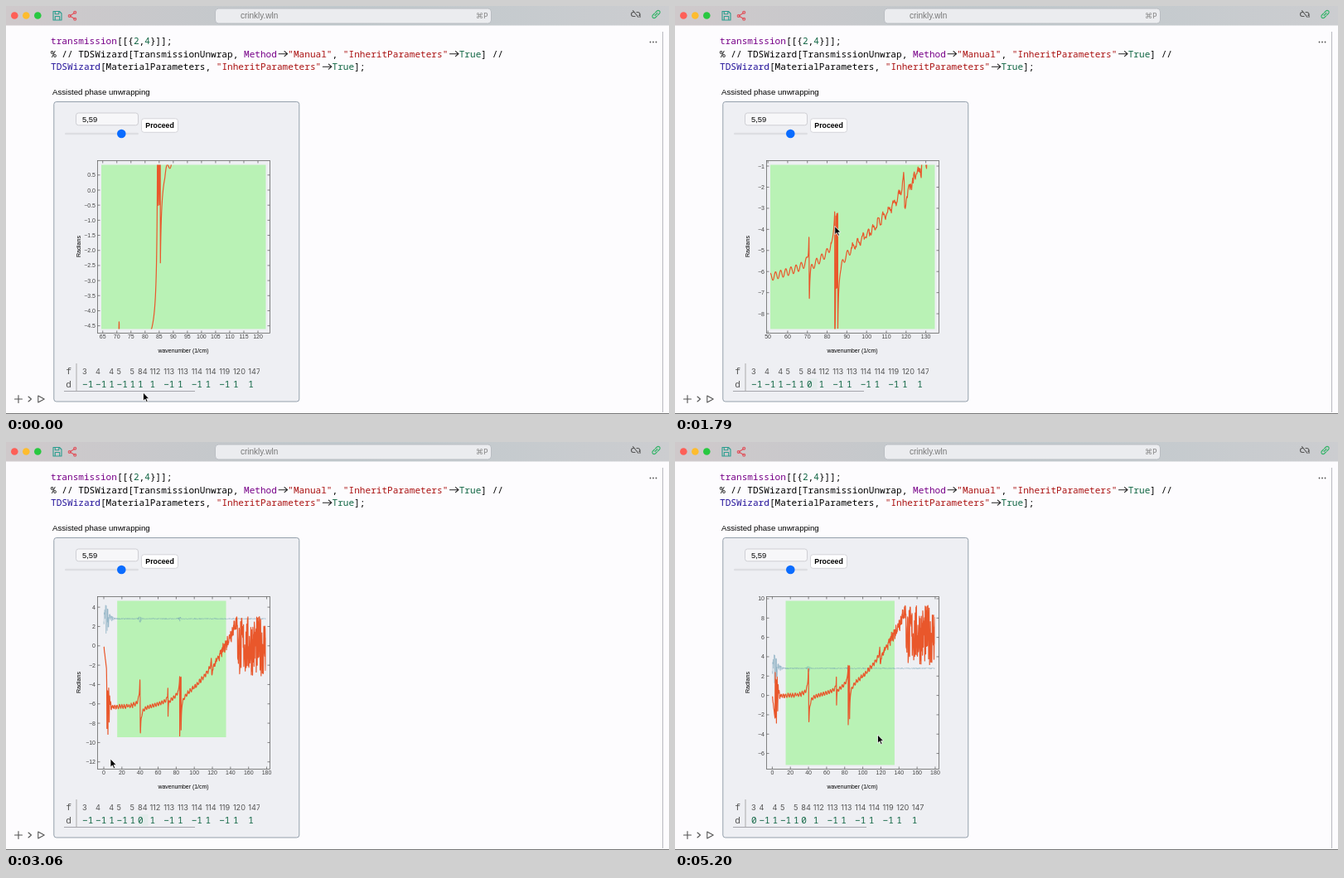
These frames come from a looping animation (800 px wide and 492 px high, 5.23 s). An HTML page:

```html
<!DOCTYPE html>
<html lang="en">
<head>
<meta charset="utf-8">
<title>Assisted phase unwrapping</title>
<style>
html, body { margin: 0; width: 100%; height: 100%; overflow: hidden; background: #fdfcfe; }
svg { display: block; width: 800px; height: 492px; font-family: "Liberation Sans", Arial, sans-serif; }
text { white-space: pre; }
.code { font: 11.1px "Noto Sans Mono", "DejaVu Sans Mono", monospace; }
.freq { font: 9.2px Inter, sans-serif; fill: #555; }
.tick { font-size: 7px; fill: #444; }
.line { fill: none; stroke: #555; stroke-width: 1.1; stroke-linecap: round; stroke-linejoin: round; }
.p { fill: #708; } .s { fill: #a11; } .n { fill: #164; } .b { fill: #219; }
.curve { fill: none; stroke-linejoin: round; vector-effect: non-scaling-stroke; }
</style>
</head>
<body>
<svg viewBox="0 0 800 492">
  <defs>
    <clipPath id="area"><rect x="115" y="191.5" width="198.5" height="198"/></clipPath>
    <clipPath id="cells"><rect x="86" y="428" width="220" height="40"/></clipPath>
    <linearGradient id="bar">
      <stop stop-color="#cfc9cb"/><stop offset=".5" stop-color="#bfc8cc"/><stop offset="1" stop-color="#cccdd0"/>
    </linearGradient>
  </defs>

  <!-- window -->
  <rect width="800" height="492" fill="#fdfcfe"/>
  <rect width="800" height="23.5" fill="url(#bar)"/>
  <path d="M0 491.5H800" stroke="#777"/>
  <path d="M792.5 31V490" stroke="#b9b9bf"/>
  <circle cx="10.3" cy="11.5" r="4.3" fill="#fe5f57"/>
  <circle cx="24.3" cy="11.5" r="4.3" fill="#febc2e"/>
  <circle cx="38.3" cy="11.5" r="4.3" fill="#28c840"/>
  <g class="line">
    <path stroke="#2a9d8f" d="M57 6.5h7.5l2.5 2.5v8h-10zM59.3 6.8v3h4.5v-3M59.3 17v-4.5h5.4v4.5"/>
    <g stroke="#e0505a"><path d="M83 8L77 12L83 15.5"/><circle cx="83.2" cy="7.7" r="1.5"/><circle cx="76.7" cy="12" r="1.5"/><circle cx="83.2" cy="15.8" r="1.5"/></g>
    <path d="M758 7.5h-1a2.3 2.3 0 0 0 0 5h2M761 7.5h1.5a2.3 2.3 0 0 1 1.5 4M756.5 5.5l6.5 8M765 9.5v4"/>
    <path stroke="#35b46a" d="M783 11.5l3-3M783.5 8l2-2a2 2 0 0 1 3 3l-2 2M785.5 12l-2 2a2 2 0 0 1-3-3l2-2"/>
    <path d="M15 469.5v9M10.5 474h9M27 471l3.5 3-3.5 3M38.8 470v8l7.4-4z"/>
  </g>
  <rect x="252.5" y="3" width="333" height="18" rx="4" fill="#ebecef" stroke="#b9bdc2"/>
  <text x="283" y="15.3" font-size="10" fill="#777">crinkly.wln</text>
  <text x="567" y="15" font-size="9" fill="#888" style="font-family:'DejaVu Sans',sans-serif">⌘P</text>
  <path d="M777.5 43.5h0M781 43.5h0M784.5 43.5h0" class="line" style="stroke-width:1.8"/>

  <!-- code -->
  <g class="code">
    <text x="54" y="46"><tspan class="p">transmission</tspan>[[{<tspan class="n">2</tspan>,<tspan class="n">4</tspan>}]];</text>
    <text x="54" y="61.5">% // TDSWizard[TransmissionUnwrap, <tspan class="p">Method</tspan>  <tspan class="s">"Manual"</tspan>, <tspan class="s">"InheritParameters"</tspan>  <tspan class="n">True</tspan>] //</text>
    <text x="54" y="77"><tspan class="b">TDSWizard</tspan>[MaterialParameters, <tspan class="s">"InheritParameters"</tspan>  <tspan class="n">True</tspan>];</text>
  </g>
  <path id="arrows" class="line" style="stroke:#222"/>
  <text x="56" y="107" font-size="9.65">Assisted phase unwrapping</text>

  <!-- panel -->
  <rect x="57.8" y="115.5" width="296" height="361.5" rx="3" fill="#eeeff3" stroke="#94a0ac"/>
  <rect x="84.5" y="129" width="75" height="14.8" rx="3" fill="#f7f7f9" stroke="#cfcfd4"/>
  <text x="92" y="139.5" font-size="9.4">5,59</text>
  <rect x="71" y="152.7" width="89" height="2.6" rx="1.3" fill="#dddee2"/>
  <circle cx="139.3" cy="154" r="5.3" fill="#0a6cff"/>
  <rect x="163.5" y="135.8" width="44" height="16.5" rx="3" fill="#fff" stroke="#d4d4d9"/>
  <text x="168.3" y="147.2" font-size="8.75" font-weight="bold">Proceed</text>

  <!-- plot -->
  <g clip-path="url(#area)">
    <g id="view">
      <rect x="14.8" y="-9.45" width="120.3" height="60" fill="#b9f2b5"/>
      <path id="pale" class="curve" stroke="rgb(110,155,180)" stroke-opacity=".34"/>
      <path id="phase" class="curve" stroke="#e9572b" stroke-width="1.2"/>
    </g>
  </g>
  <rect x="110.5" y="186.5" width="208" height="208" fill="none" stroke="#666" stroke-width=".8"/>
  <path id="marks" stroke="#666" stroke-width=".8"/>
  <g id="labels" class="tick"></g>
  <text x="214" y="418" font-size="6.9" text-anchor="middle">wavenumber (1/cm)</text>
  <text transform="translate(89.5 290) rotate(-90)" font-size="7.1" text-anchor="middle">Radians</text>

  <!-- table -->
  <g class="code" fill="#555"><text x="72.3" y="443.7">f</text><text x="72.3" y="460.3">d</text></g>
  <path d="M85 431V465" stroke="#aaa"/>
  <path id="rule" stroke="#a5a5ab"/>
  <g id="table" clip-path="url(#cells)"></g>
  <path id="beam" stroke="#222" stroke-width="1.2"/>
  <path id="pointer" d="M0 0V10.2L2.4 8L4 11.8L5.7 11L4.1 7.4H7.2Z" stroke="#fff" stroke-width=".8"/>
</svg>
<script>
const $ = id => document.getElementById(id);
const TAU = 2 * Math.PI, LOOP = 5230;
const SELECT_A = 600, TYPE_A = 970, SELECT_B = 4100, TYPE_B = 4520;
const JUMP_A = 83.85, JUMP_B = 3.22, NOISY = 147.5, END = 193;

let seed = 7;
const rnd = () => (seed = (seed * 16807) % 2147483647) / 2147483647;
const noise = a => a * (2 * rnd() - 1);

// absorption line: a peak before its centre, a dip after it
const line = (x, centre, gain, width) => gain * (centre - x) / ((centre - x) ** 2 + width ** 2);

// the strong line near 85 winds by a full turn
const strongLine = x =>
  x < 84.45 ? 1.7 / (84.65 - x) - (x > JUMP_A ? TAU : 0) :
  x < 85.4 ? .2 + 1.8 * Math.cos(TAU * (x - 84.45) / .45) :
  1.7 / (84.95 - x);

const noiseAmp = x =>
  x < JUMP_B ? .1 :
  x < 36 ? .1 + 4 * Math.exp(-(((x - JUMP_B) / 3) ** 2)) :
  x < 92 ? 0 : .12 + Math.max(0, x - 120) * .032;

function phaseAt(x) {
  if (x > NOISY) return (x < 186.5 ? 0 : -TAU) + noise(3.1);
  if (x < JUMP_B) return -.8 * x + noise(.1);
  const ripple = x > 82 && x < 87 ? 0 : .18 * Math.cos(TAU * (x - 66.85) / 2.6);
  return 9.2 * (x / NOISY) ** 3.6 - 6.4 + ripple + noise(noiseAmp(x)) + strongLine(x) +
    line(x, 40.2, 1.6, .28) + line(x, 70.9, .3, .1) + line(x, 119.1, .5, .3);
}
function paleAt(x) {
  const near = (c, a, w) => a * Math.exp(-Math.abs(x - c) / w);
  return 2.8 + noise(.06 + near(3, 2.3, 2.6) + near(40, .5, 1) + near(84, .25, 1));
}
function sample(fn, step) {
  const pts = [];
  for (let x = 0; x < END; x += step(x)) pts.push([x, fn(x)]);
  return pts;
}
const toPath = pts => "M" + pts.map(([x, y]) => x.toFixed(3) + " " + y.toFixed(3)).join("L");
const phase = sample(phaseAt, x => noiseAmp(x) ? .27 : .05);
$("pale").setAttribute("d", toPath(sample(paleAt, () => .25)));

const arrow = (column, y) => `M${56 + column * 6.66} ${y}h10.5m-3.5-3l3.5 3l-3.5 3`;
$("arrows").setAttribute("d", arrow(41, 57.7) + arrow(72, 57.7) + arrow(49, 73.2));

// eased moves: [from, to, ...values]
function track(t, first, moves) {
  return moves.reduce((v, [from, to, ...goal]) => {
    const u = Math.min(1, Math.max(0, (t - from) / (to - from))), e = u * u * (3 - 2 * u);
    return v.map((a, i) => a + (goal[i] - a) * e);
  }, first);
}

// view: x scale, x origin, y origin
const ASPECT = 10.68, firstView = [3.405, -104.6, 222];
const views = [
  [1180, 1460, 3.405, -104.6, 111.6],
  [1560, 2080, .949, 129.7, 246],
  [2450, 2750, 1.092, 118, 245.8],
  [4800, 5150, 1.092, 117.4, 305.6]
];
const firstPoint = [165.5, 466];
const moves = [
  [100, 400, 160, 456],
  [500, 1100, 198, 373],
  [1180, 1460, 197.5, 262],
  [1600, 2080, 184, 272],
  [2200, 2450, 207, 247],
  [2750, 3060, 126, 382],
  [3060, 3500, 99, 474],
  [4000, 4700, 246, 294],
  [4800, 5150, 244.5, 353]
];
const arrowShown = t => t < 400 || (t > 1130 && t < 3900) || t > 4700;

const stepFor = scale => {
  const p = 10 ** Math.floor(Math.log10(13 / scale));
  return [1, 2, 5, 10].map(m => m * p).find(s => s * scale >= 13);
};
function ticks(scale, origin, lo, hi, put) {
  const step = stepFor(Math.abs(scale)), digits = step < 1 ? 1 : 0;
  const [a, b] = [(lo - origin) / scale, (hi - origin) / scale].sort((p, q) => p - q);
  for (let k = Math.ceil(a / step); k * step <= b; k++)
    put(origin + k * step * scale, (k * step).toFixed(digits).replace("-", "−"));
}

function drawPlot([sx, ox, oy]) {
  const sy = -sx * ASPECT;
  $("view").setAttribute("transform", `matrix(${sx} 0 0 ${sy} ${ox} ${oy})`);
  let marks = "", labels = "";
  ticks(sx, ox, 110.5, 318.5, (p, s) => {
    marks += `M${p} 394.5v-3M${p} 186.5v3`;
    labels += `<text x="${p}" y="401.3" text-anchor="middle">${s}</text>`;
  });
  ticks(sy, oy, 187, 394, (p, s) => {
    marks += `M110.5 ${p}h3M318.5 ${p}h-3`;
    labels += `<text x="108" y="${p + 2.5}" text-anchor="end">${s}</text>`;
  });
  $("marks").setAttribute("d", marks);
  $("labels").innerHTML = labels;
}

const freqs = "3 4 4 5 5 84 112 113 113 114 114 119 120 147".split(" ");
const signs = "--+-+++-+-+-++";
const freqWidth = s => [...s].reduce((w, c) => w + (c == "1" ? 4.1 : 5.8), 0);

function drawTable(t) {
  const typedA = t >= TYPE_A, typedB = t >= TYPE_B;
  const box = (x, w, fill) => `<rect x="${x}" y="449" width="${w}" height="14" fill="${fill}"/>`;
  let out = "", x = 92;
  if (t >= SELECT_A && t < SELECT_B) out += box(159.5, 12, "#e4ecec");
  if (t >= SELECT_A && !typedA) out += box(159.5, 7, "#c5bfd8");
  if (t >= SELECT_B && !typedB) out += box(92, 13.3, "#cdc6de");
  freqs.forEach((f, i) => {
    const zero = (i == 5 && typedA) || (i == 0 && typedB);
    const d = zero ? "0" : signs[i] == "-" ? "−1" : "1";
    out += `<text class="freq" x="${x}" y="443.5">${f}</text>` +
      `<text class="code n" x="${x}" y="460.3">${d}</text>`;
    x += Math.max(freqWidth(f), d.length * 6.66) + 2.75;
  });
  $("table").innerHTML = out;
  $("rule").setAttribute("d", `M70 464.5H${typedB ? 231 : 228}`);

  const blink = since => (t - since) % 1200 < 600;
  const bar = t >= 400 && !typedA ? 159
    : typedA && t < SELECT_B && blink(TYPE_A) ? 166.3
    : typedB && blink(TYPE_B) ? 98.8 : 0;
  $("beam").setAttribute("d", bar ? `M${bar} 449.5V463` : "");
}

let shown = "";
function drawPhase(t) {
  const a = t < TYPE_A ? TAU : 0, b = t >= TYPE_B ? TAU : 0, key = a + "," + b;
  if (shown === key) return;
  shown = key;
  $("phase").setAttribute("d", toPath(phase.map(([x, y]) =>
    [x, y + (x > JUMP_A ? a : 0) + (x > JUMP_B ? b : 0)])));
}

const origin = performance.now();
function frame() {
  const t = (performance.now() - origin) % LOOP;
  drawPhase(t);
  drawPlot(track(t, firstView, views));
  drawTable(t);
  $("pointer").setAttribute("transform", `translate(${track(t, firstPoint, moves)})`);
  $("pointer").setAttribute("visibility", arrowShown(t) ? "visible" : "hidden");
  requestAnimationFrame(frame);
}
frame();
</script>
</body>
</html>
```
